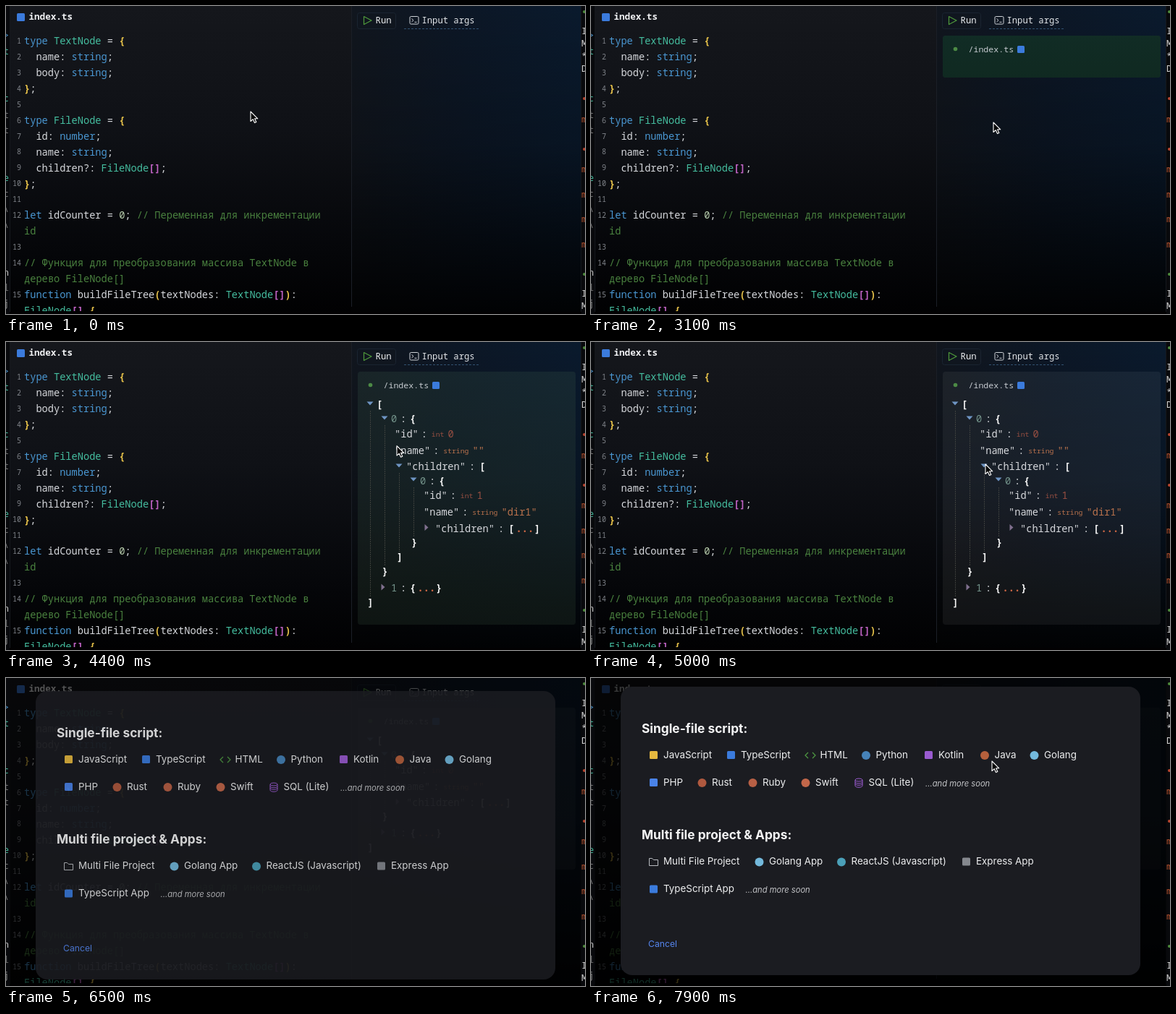
Recreate the animation shown at these times as an HTML page. Size 800 px wide and 426 px high, loop 8 s.

```html
<!DOCTYPE html>
<html lang="ru">
<head>
<meta charset="utf-8">
<title>Code runner</title>
<style>
html, body { margin: 0; width: 100%; height: 100%; overflow: hidden; background: #000; }
svg { display: block; width: 800px; height: 426px; }
text { white-space: pre; }
.mono { font-family: "Noto Sans Mono", "DejaVu Sans Mono", monospace; }
.sans { font-family: Inter, "Open Sans", sans-serif; }
</style>
</head>
<body>
<svg id="stage" viewBox="0 0 800 426">
  <defs>
    <linearGradient id="leftBg" x1="0" y1="0" x2="0" y2="1">
      <stop offset="0" stop-color="#15171c"/><stop offset=".4" stop-color="#0f1116"/>
      <stop offset=".8" stop-color="#050609"/><stop offset="1" stop-color="#010102"/>
    </linearGradient>
    <linearGradient id="rightBg" x1="0" y1="0" x2="1" y2="0">
      <stop offset="0" stop-color="#11161e"/><stop offset=".5" stop-color="#0c1726"/>
      <stop offset="1" stop-color="#0a1a2d"/>
    </linearGradient>
    <linearGradient id="fade" x1="0" y1="0" x2="0" y2="1">
      <stop offset="0" stop-color="#000" stop-opacity="0"/><stop offset=".45" stop-color="#000" stop-opacity=".22"/>
      <stop offset="1" stop-color="#000" stop-opacity=".92"/>
    </linearGradient>
    <linearGradient id="green" gradientUnits="userSpaceOnUse" x1="0" y1="41" x2="0" y2="391">
      <stop offset="0" stop-color="#112c25"/><stop offset=".5" stop-color="#0d2419"/>
      <stop offset="1" stop-color="#081b0e"/>
    </linearGradient>
    <clipPath id="codeClip"><rect x="5" y="0" width="472" height="422"/></clipPath>
  </defs>
</svg>
<script>
const NS = 'http://www.w3.org/2000/svg';
const LOOP = 8000, STEP = 100, CH = 8.2, SIZE = 13.67;
const stage = document.getElementById('stage');

function add(parent, tag, attrs = {}, content) {
  const el = document.createElementNS(NS, tag);
  for (const k in attrs) el.setAttribute(k, attrs[k]);
  if (content !== undefined) el.textContent = content;
  parent.appendChild(el);
  return el;
}
const group = (parent, attrs) => add(parent, 'g', attrs);
const rect = (p, x, y, width, height, fill, more) => add(p, 'rect', { x, y, width, height, fill, ...more });
const line = (p, d, stroke, more) => add(p, 'path', { d, stroke, fill: 'none', ...more });
const dot = (p, cx, cy, r, fill) => add(p, 'circle', { cx, cy, r, fill });
// y is the vertical middle of the capitals
const label = (p, x, y, str, size, fill, more) =>
  add(p, 'text', { x, y: y + size * 0.35, 'font-size': size, fill, ...more }, str);
const show = (el, on) => el.setAttribute('visibility', on ? 'visible' : 'hidden');

const C = {
  text: '#d6d8dc', key: '#4a97d2', type: '#45bd9f', gold: '#e8c34a', purple: '#c063c4',
  note: '#4a823f', num: '#b9cfae', gutter: '#80848a', ts: '#3b7bdc'
};

// Neighbouring window slivers at both edges
function drawEdges(root) {
  const g = group(root, { class: 'mono' });
  rect(g, 0, 0, 800, 426, '#08090c');
  [['>', 41, C.key], ['t', 63, C.type], ['c', 128, C.type], ['t', 151, '#777'], ['t', 172, '#777'],
   ['e', 238, C.type], ['c', 260, '#777'], ['\\', 281, '#777'], ['\\', 303, '#777'],
   ['n', 369, '#ccc'], ['l', 390, '#666'], ['j', 412, '#888']
  ].forEach(([s, y, f]) => label(g, 4, y, s, 12, f, { 'text-anchor': 'end' }));
  [['I', 34], ['M', 51], ['*', 69], ['D', 86], ['I', 397], ['M', 414]]
    .forEach(([s, y]) => label(g, 795, y, s, 13, '#d0d0d0'));
  [156, 225, 260, 294, 329].forEach(y => label(g, 795, y, 'm', 13, '#b5522f'));
  dot(g, 799, 128, 2, '#b8452f');
  dot(g, 799, 198, 2, '#b8452f');
  dot(g, 799, 8, 2, '#4d8a3c');
  dot(g, 799, 371, 2, '#4d8a3c');
}

function drawBase(root) {
  rect(root, 5, 0, 472, 426, 'url(#leftBg)');
  rect(root, 477, 0, 318, 426, 'url(#rightBg)');
  rect(root, 477, 0, 318, 426, 'url(#fade)');
  rect(root, 5, 423, 790, 3, '#020102');
  line(root, 'M477.5 0V416', '#1b1f27');
  line(root, 'M5.5 0V423M794.5 0V423', '#15181d');
}

const CODE = [
  [1, 'type TextNode = {'], [2, '  name: string;'], [3, '  body: string;'], [4, '};'], [5, ''],
  [6, 'type FileNode = {'], [7, '  id: number;'], [8, '  name: string;'],
  [9, '  children?: FileNode[];'], [10, '};'], [11, ''],
  [12, 'let idCounter = 0; // Переменная для инкрементации'], [0, 'id', true], [13, ''],
  [14, '// Функция для преобразования массива TextNode в'], [0, 'дерево FileNode[]', true],
  [15, 'function buildFileTree(textNodes: TextNode[]):'], [0, 'FileNode[] {']
];
const TOKEN = /(\/\/.*)|\b(type|let|function|string|number)\b|\b(TextNode|FileNode)\b|([{}()])|([\[\]])|\b(\d+)\b/g;
const TOKEN_FILL = [C.note, C.key, C.type, C.gold, C.purple, C.num];

function drawCode(root) {
  const g = group(root, { class: 'mono', 'clip-path': 'url(#codeClip)' });
  rect(g, 15, 10, 11, 11, C.ts, { rx: 1.5 });
  label(g, 31.5, 14.2, 'index.ts', 12.6, '#f0f1f3', { 'font-weight': 700 });
  CODE.forEach(([n, str, note], i) => {
    const y = 48.5 + i * 21.92;
    if (n) label(g, 21, y, n, 10, C.gutter, { 'text-anchor': 'end' });
    const t = label(g, 25, y, '', SIZE, C.text);
    if (note) { add(t, 'tspan', { fill: C.note }, str); return; }
    let at = 0;
    for (const m of str.matchAll(TOKEN)) {
      add(t, 'tspan', {}, str.slice(at, m.index));
      const kind = m.slice(1).findIndex(Boolean);
      add(t, 'tspan', { fill: TOKEN_FILL[kind], 'font-weight': kind === 3 || kind === 4 ? 600 : 400 }, m[0]);
      at = m.index + m[0].length;
    }
    add(t, 'tspan', {}, str.slice(at));
  });
}

function drawToolbar(root) {
  const g = group(root, { class: 'mono' });
  rect(g, 485.5, 9.5, 53, 22, '#10161f', { rx: 3, stroke: '#1a2431' });
  line(g, 'M494.5 14.5L505 20L494.5 25.5Z', '#4f9a3c', { 'stroke-width': 1.2, 'stroke-linejoin': 'round' });
  label(g, 510.5, 20, 'Run', 12.3, '#eceef0', { 'font-weight': 500 });
  rect(g, 558, 14.5, 12, 10.5, 'none', { rx: 1.5, stroke: '#cfd3d8' });
  line(g, 'M560.5 17.5L563 19.7L560.5 22M564.5 22.3H567.5', '#cfd3d8');
  label(g, 574.5, 20, 'Input args', 12.2, '#e2e5e8', { 'font-weight': 500 });
  line(g, 'M550 31.5H653', '#31506f', { 'stroke-dasharray': '3 2' });
}

function drawRunning(root) {
  const g = group(root, { class: 'mono' });
  label(g, 486, 50, 'Running...', 10.9, '#e4e6e8');
  const arcs = [500, 564].map(x => ({
    x, el: add(g, 'circle', { cx: x, cy: 20, r: 6.5, fill: 'none', stroke: '#3c6fb8', 'stroke-width': 1.3, 'stroke-dasharray': '30 11', opacity: .7 })
  }));
  return { g, spin: deg => arcs.forEach(a => a.el.setAttribute('transform', `rotate(${deg} ${a.x} 20)`)) };
}

function drawTree(root, open) {
  const g = group(root, { class: 'mono' });
  const mark = (x, y, s) => label(g, x, y, s, SIZE, '#f4f4f4', { 'font-weight': 700 });
  const put = (x, y, s, f = C.text) => label(g, x, y, s, SIZE, f);
  const down = (x, y) => add(g, 'path', { d: `M${x - 4.5} ${y - 2.5}h9l-4.5 5z`, fill: '#6f95c4' });
  const right = (x, y) => add(g, 'path', { d: `M${x - 2.5} ${y - 4.5}v9l5 -4.5z`, fill: '#80708e' });
  const guide = (x, y1, y2) => line(g, `M${x + .5} ${y1}V${y2}`, '#4b4d47', { 'stroke-dasharray': '2 1', opacity: .75 });
  const folded = (x, y, a, b) => {
    mark(x, y, a);
    label(g, x + 10.5, y, '...', SIZE, '#cf6846', { 'font-weight': 700 });
    mark(x + 36, y, b);
  };
  const field = (x, y, key, kind, value, tone) => {
    const cx = x + key.length * CH + 4;
    put(x, y, key);
    put(cx, y, ':');
    label(g, cx + 14, y + 1, kind, 9.8, tone);
    put(cx + 19 + kind.length * 5.9, y, value, tone);
  };
  const index = (x, y, n) => { put(x, y, n, '#73938a'); put(x + 13, y, ':'); };
  const children = (x, y) => { put(x, y, '"children"'); put(x + 87, y, ':'); };
  const red = '#984f42', orange = '#b8714c';

  const lift = open ? 0 : 126;
  down(503, 85); mark(512, 86, '[');
  down(523, 105); index(532, 106, '0'); mark(558, 106, '{');
  field(537, 127, '"id"', 'int', '0', red);
  field(537, 150, '"name"', 'string', '""', orange);
  children(553, 172);
  if (open) {
    down(543, 171); mark(654, 172, '[');
    down(563, 190); index(572, 192, '0'); mark(598, 192, '{');
    field(577, 212, '"id"', 'int', '1', red);
    field(577, 235, '"name"', 'string', '"dir1"', orange);
    right(581, 256.5); children(593, 258); folded(694, 258, '[', ']');
    mark(560, 277, '}');
    mark(540, 297, ']');
    guide(543, 181, 290);
    guide(563, 201, 269);
  } else {
    right(541, 171); folded(654, 172, '[', ']');
  }
  mark(519.5, 317 - lift, '}');
  right(521, 339 - lift); index(532, 340 - lift, '1'); folded(558, 340 - lift, '{', '}');
  mark(499.5, 360 - lift, ']');
  guide(503, 95, 352 - lift);
  guide(523, 115, 310 - lift);
  return g;
}

function drawPanel(root) {
  const g = group(root, { class: 'mono' });
  const boxes = [
    rect(g, 486, 41, 301, 58, '#fff', { rx: 4, 'fill-opacity': .055 }),
    rect(g, 486, 41, 301, 58, 'url(#green)', { rx: 4 })
  ];
  dot(g, 503.5, 59.5, 2.8, '#4c8a45');
  label(g, 521.5, 59.5, '/index.ts', 11.6, '#c6cbd0');
  rect(g, 589, 55, 10, 10, C.ts, { rx: 1.5 });
  return {
    g, open: drawTree(g, true), closed: drawTree(g, false),
    size: h => boxes.forEach(b => b.setAttribute('height', h)),
    tint: a => boxes[1].setAttribute('opacity', a)
  };
}

const ICONS = {
  square: (g, x, y, f) => rect(g, x - 5.5, y - 5, 11, 11, f, { rx: 1.5 }),
  circle: (g, x, y, f) => dot(g, x, y + 1, 6, f),
  tag: (g, x, y, f) => line(g, `M${x - 3} ${y - 3}l-4 4l4 4M${x + 3} ${y - 3}l4 4l-4 4`, f, { 'stroke-width': 1.2 }),
  folder: (g, x, y, f) => line(g, `M${x - 6} ${y - 4}h4l2 2h6v8h-12z`, f, { 'stroke-linejoin': 'round' }),
  disk: (g, x, y, f) => {
    const bow = dy => `M${x - 5} ${y + dy}c0 3 10 3 10 0`;
    add(g, 'ellipse', { cx: x, cy: y - 3, rx: 5, ry: 2, fill: 'none', stroke: f });
    line(g, `M${x - 5} ${y - 3}v8M${x + 5} ${y - 3}v8${bow(-0.5)}${bow(2)}${bow(5)}`, f);
  }
};
const ITEMS = [
  [106, 100, 'JavaScript', 'square', '#e5b83f'], [106, 207, 'TypeScript', 'square', C.ts],
  [106, 316.5, 'HTML', 'tag', '#4f9a43'], [106, 393.5, 'Python', 'circle', '#4682b8'],
  [106, 480, 'Kotlin', 'square', '#9a5bd0'], [106, 557.5, 'Java', 'circle', '#b5603c'],
  [106, 626, 'Golang', 'circle', '#73b9dc'],
  [144, 100, 'PHP', 'square', '#4a83e8'], [144, 167, 'Rust', 'circle', '#b0593f'],
  [144, 237, 'Ruby', 'circle', '#b86045'], [144, 310, 'Swift', 'circle', '#c2674a'],
  [144, 383.5, 'SQL (Lite)', 'disk', '#9a5bd0'],
  [253.5, 100, 'Multi File Project', 'folder', '#b9bcc1'], [253.5, 246, 'Golang App', 'circle', '#73b9dc'],
  [253.5, 359.5, 'ReactJS (Javascript)', 'circle', '#4ba0b8'], [253.5, 532, 'Express App', 'square', '#85888e'],
  [291.5, 100, 'TypeScript App', 'square', C.ts]
];

function drawModal(root) {
  const shade = rect(root, 5, 0, 790, 426, '#000');
  const g = group(root, { class: 'sans' });
  rect(g, 41, 12, 718, 399, '#1b1c21', { rx: 16 });
  const head = (y, s) => label(g, 70, y, s, 17.3, '#f5f5f6', { 'font-weight': 700 });
  const more = (x, y) => label(g, x, y, '...and more soon', 11.2, '#c3c4c7', { 'font-style': 'italic' });
  head(70, 'Single-file script:');
  head(217, 'Multi file project & Apps:');
  ITEMS.forEach(([y, x, name, icon, fill]) => {
    ICONS[icon](g, x - 13.5, y, fill);
    label(g, x, y, name, 13.4, '#eeeff0');
  });
  more(462, 146);
  more(213.5, 293.5);
  label(g, 79, 368, 'Cancel', 12.2, '#5585ee');
  return { g, shade };
}

function drawCursor(root) {
  const g = group(root);
  add(g, 'path', {
    d: 'M0 0V13.5L3.2 10.6L5.5 15.6L7.8 14.6L5.6 9.8H9.8Z',
    fill: '#050505', stroke: '#fff', 'stroke-width': 1.1, 'stroke-linejoin': 'round'
  });
  const ban = group(g, { transform: 'translate(8 19)' });
  add(ban, 'circle', { r: 6.5, fill: '#151515', stroke: '#fff', 'stroke-width': 2 });
  line(ban, 'M-4.4 -4.4L4.4 4.4', '#fff', { 'stroke-width': 2 });
  return { g, ban };
}

// time, x, y
const PATH = [
  [0, 338, 146], [300, 338, 146], [1100, 518, 23], [2000, 518, 23], [2700, 556, 161],
  [3100, 556, 161], [3500, 533, 108], [3900, 533, 108], [4800, 545, 169], [5400, 545, 169],
  [6000, 600, -20], [6800, 600, -20], [7700, 554, 115], [LOOP, 554, 115]
];
const clamp = v => Math.min(1, Math.max(0, v));
const part = (t, from, to) => clamp((t - from) / (to - from));

function cursorAt(t) {
  const i = PATH.findIndex(k => k[0] > t);
  const [t0, x0, y0] = PATH[i - 1], [t1, x1, y1] = PATH[i];
  const p = part(t, t0, t1), e = p * p * (3 - 2 * p);
  return [x0 + (x1 - x0) * e, y0 + (y1 - y0) * e];
}

drawEdges(stage);
drawBase(stage);
drawCode(stage);
drawToolbar(stage);
const running = drawRunning(stage);
const panel = drawPanel(stage);
const modal = drawModal(stage);
const cursor = drawCursor(stage);

function render(t) {
  show(running.g, t >= 1200 && t < 2800);
  running.spin(t * 0.36);

  const ready = t >= 2900, filled = t >= 3200, folded = t >= 5200;
  show(panel.g, ready);
  show(panel.open, ready && filled && !folded);
  show(panel.closed, folded);
  panel.size(folded ? 224 : filled ? 350 : 58);
  panel.tint(1 - part(t, 3700, 4700));

  const p = part(t, 6350, 6650);
  const alpha = 1 - (1 - p) ** 2.8;
  modal.shade.setAttribute('opacity', alpha * 0.77);
  modal.g.setAttribute('opacity', alpha);
  modal.g.setAttribute('transform', `translate(0 ${48 * (1 - p) ** 3})`);

  cursor.g.setAttribute('transform', `translate(${cursorAt(t)})`);
  show(cursor.ban, t >= 1200 && t < 2200);
}

const start = performance.now();
function tick() {
  const t = (performance.now() - start) % LOOP;
  render(Math.floor(t / STEP) * STEP);
  requestAnimationFrame(tick);
}
tick();
</script>
</body>
</html>
```
